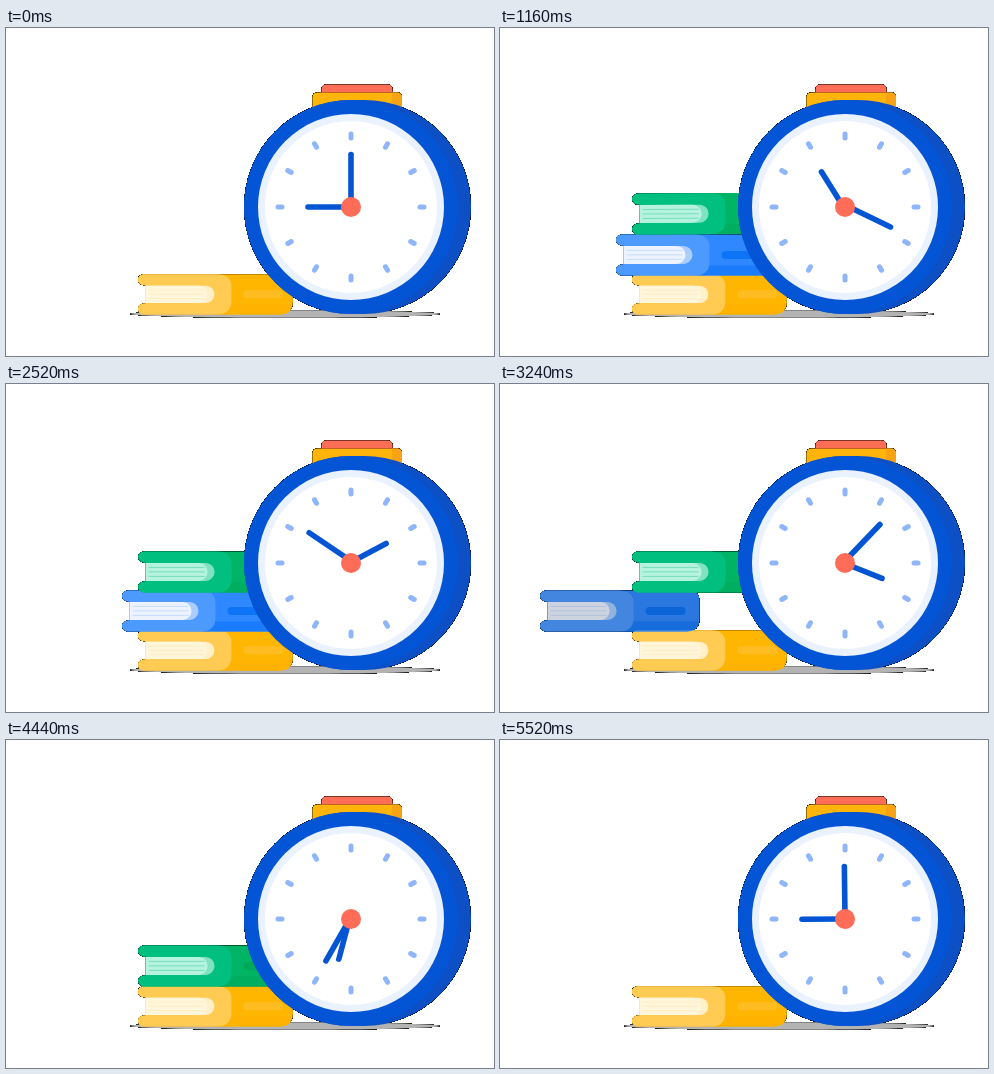
Write an HTML page that moves like this. It is 488x328 px and loops after 5.56 s.

```html
<!DOCTYPE html>
<html lang="en">
<head>
<meta charset="utf-8">
<title>Clock and books</title>
<style>
  html, body { margin: 0; width: 100%; height: 100%; overflow: hidden; background: #fff; }
  svg { display: block; width: 488px; height: 328px; }
  .hand { stroke: #0455d4; stroke-width: 5.6; stroke-linecap: round; }
  .tick { stroke: #8fb5fa; stroke-width: 5; stroke-linecap: round; }
</style>
</head>
<body>
<svg viewBox="0 0 488 328">
  <!-- Soft edges darken towards black and are then cut off hard -->
  <filter id="matte" filterUnits="userSpaceOnUse" x="0" y="0" width="488" height="328" color-interpolation-filters="sRGB">
    <feComponentTransfer in="SourceAlpha">
      <feFuncA type="discrete" tableValues="0 1 1 1 1 1 1 1"/>
    </feComponentTransfer>
    <feMerge>
      <feMergeNode/>
      <feMergeNode in="SourceGraphic"/>
    </feMerge>
  </filter>
  <g id="stage" filter="url(#matte)"></g>
</svg>
<script>
const LOOP = 5560, STEP = 40;
const stage = document.getElementById('stage');

function add(parent, tag, attrs = {}) {
  const el = document.createElementNS('http://www.w3.org/2000/svg', tag);
  for (const key in attrs) el.setAttribute(key, attrs[key]);
  return parent.appendChild(el);
}

// A book lying flat, its top left corner at 0,0
function book(w, h, c) {
  const g = add(stage, 'g');
  const left = 'H5 a5.5 5.5 0 0 1 0 -11 H7 V11 H5 a5.5 5.5 0 0 1 0 -11 Z';
  const r = h / 2 - 11.5, low = h - 10;
  add(g, 'path', { fill: c.body,
    d: `M5 0 H${w - 10} q10 0 10 10 V${h - 13} q0 13 -13 13 ${left}` });
  add(g, 'path', { fill: c.shade, d: `M80 ${low} H${w - 1} Q${w - 4} ${h} ${w - 13} ${h} H80 Z` });
  add(g, 'path', { fill: c.light,
    d: `M5 0 H78 q15 0 15 13 V${h - 14} q0 14 -15 14 ${left}` });
  add(g, 'path', { fill: c.cap, d: `M7 11.5 H${76 - r} a${r} ${r} 0 0 1 0 ${2 * r} H7 Z` });
  add(g, 'path', { fill: c.page, d: `M7 11.5 H${69 - r} a${r} ${r} 0 0 1 0 ${2 * r} H7 Z` });
  for (let i = 1; i < 4; i++)
    add(g, 'path', { d: `M10 ${11.5 + r * i / 2} H66`, stroke: c.line, 'stroke-width': .9 });
  add(g, 'rect', { x: 105, y: h / 2 - 4, width: 40, height: 8, rx: 4, fill: c.pill });
  return g;
}

add(stage, 'ellipse', { cx: 279, cy: 286, rx: 155, ry: 3.8, fill: '#b3b3b3' });

const yellow = book(154.5, 40.2, { body: '#ffb600', shade: '#ffb200', light: '#ffcb52', cap: '#fff0c8', page: '#fff6dc', line: '#ffedbd', pill: '#ffbd22' });
const blue = book(159, 41, { body: '#2f88ff', shade: '#1a7cfb', light: '#4d9aff', cap: '#a9cdff', page: '#ecf3ff', line: '#c3dbff', pill: '#0d74f7' });
const green = book(159, 41, { body: '#00b466', shade: '#00ae5f', light: '#00bf7f', cap: '#7fe3c3', page: '#b5f3df', line: '#6fdcb9', pill: '#00a85a' });
yellow.setAttribute('transform', 'translate(132.4 246.2)');

// Clock
add(stage, 'path', { fill: '#ffb409', d: 'M306.4 86 V69.4 q0 -5 5 -5 H391 q5 0 5 5 V86 Z' });
add(stage, 'path', { fill: '#f7a313', d: 'M386 64.4 H391 q5 0 5 5 V86 H386 Z' });
add(stage, 'path', { fill: '#ff6e55', d: 'M315.5 64.4 V61.4 q0 -5 5 -5 H381.5 q5 0 5 5 V64.4 Z' });
add(stage, 'path', { fill: '#0d4fc4', d: 'M345 72 H358 a107 107 0 0 1 0 214 H345 a107 107 0 0 1 0 -214 Z' });
add(stage, 'circle', { cx: 345, cy: 179, r: 107, fill: '#0355d6' });

const dial = add(stage, 'g', { transform: 'translate(345 179)' });
add(dial, 'circle', { r: 93, fill: '#ebf2ff' });
add(dial, 'circle', { r: 86, fill: '#fff' });
for (let a = 0; a < 360; a += 30)
  add(dial, 'path', { class: 'tick', d: 'M0 -69 V-73', transform: `rotate(${a})` });
const hour = add(dial, 'path', { class: 'hand', d: 'M0 0 V-41.5' });
const minute = add(dial, 'path', { class: 'hand', d: 'M0 0 V-50.5' });
add(dial, 'circle', { r: 10, fill: '#ff6c57' });

// Smooth progress 0..1 between two times
const clamp = v => Math.min(1, Math.max(0, v));
const span = (t, from, to) => clamp((t - from) / (to - from));
const ease = (t, from, to) => { const x = span(t, from, to); return x * x * (3 - 2 * x); };

const motions = [
  { el: blue, x: 116.5, y: 206.4, enter: [200, 1080], rise: 87, tilt: 21.7, exit: [2760, 3660], fade: [3180, 3660] },
  { el: green, x: 132.6, y: 167.4, enter: [360, 1240], rise: 96, tilt: -12, exit: [4440, 5220], fade: [4780, 5220], drop: [3480, 3960] }
];

function placeBook(m, t) {
  const up = 1 - ease(t, ...m.enter);
  const x = m.x - 138 * ease(t, ...m.exit);
  const y = m.y - m.rise * up + (m.drop ? 38 * ease(t, ...m.drop) : 0);
  const alpha = Math.min(span(t, m.enter[0], m.enter[0] + 320), 1 - span(t, ...m.fade));
  m.el.setAttribute('transform', `translate(${x} ${y}) rotate(${m.tilt * up} 80 20.5)`);
  m.el.setAttribute('opacity', alpha);
}

// Hands speed up briefly, then run evenly
function turned(t) {
  const s = Math.max(0, t - 200), ramp = 246;
  return .0692 * (s < ramp ? s * s / (2 * ramp) : s - ramp / 2);
}

function draw(now) {
  const t = Math.floor(now % LOOP / STEP) * STEP;
  const a = turned(t);
  hour.setAttribute('transform', `translate(-1.5 0) rotate(${270 + a})`);
  minute.setAttribute('transform', `translate(0 -2) rotate(${2 * a})`);
  motions.forEach(m => placeBook(m, t));
}

const start = performance.now();
function tick() {
  draw(performance.now() - start);
  requestAnimationFrame(tick);
}
tick();
</script>
</body>
</html>
```
